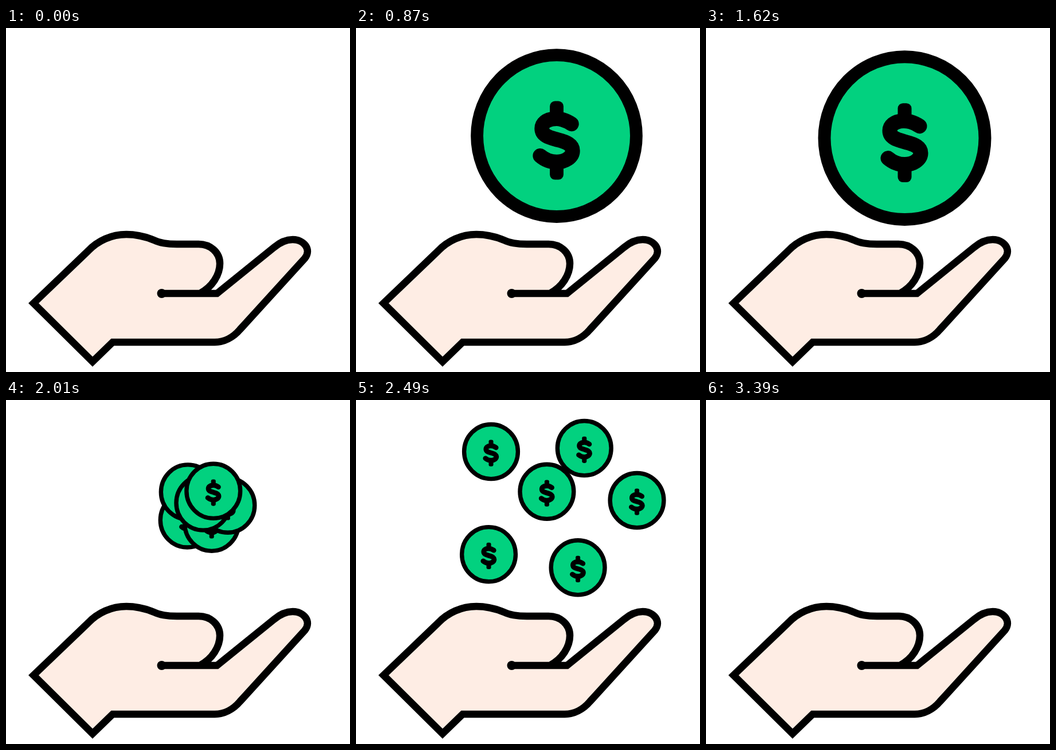
These frames come from a looping animation (600x600 px, 3.63 s). An HTML page:

```html
<!DOCTYPE html>
<html lang="en">
<head>
<meta charset="utf-8">
<title>Coins over a hand</title>
<style>
  html, body { margin: 0; width: 100%; height: 100%; overflow: hidden; background: #fff; }
  svg { display: block; width: 100vw; height: 100vh; }
</style>
</head>
<body>
<svg viewBox="0 0 600 600">
  <defs>
    <g id="coin">
      <ellipse rx="140" ry="142" fill="#02d17f" stroke="#000" stroke-width="22"/>
      <g transform="translate(0 8)">
        <path d="M26 -29C16 -36 4 -39 -4 -38C-18 -37 -26 -30 -26 -21C-26 -8 -12 -5 2 -1C18 3 28 8 28 18C28 30 14 38 0 38C-12 38 -22 33 -29 27"
              fill="none" stroke="#000" stroke-width="26" stroke-linecap="round"/>
        <rect x="-12" y="-69" width="24" height="34" rx="9"/>
        <rect x="-12" y="35" width="24" height="34" rx="9"/>
      </g>
    </g>
  </defs>
  <path d="M271 463H368L467 383C480 372 492 369 500 369C519 369 534 386 521 402L408 526C396 540 380 548 364 548H186L151 582L48 480L143 389C160 371 184 360 210 360C230 360 246 365 258 370C268 375 280 377 298 377H336C356 377 373 391 373 411C373 430 360 452 338 463"
        fill="#feede4" stroke="#000" stroke-width="12.5" stroke-miterlimit="10"/>
  <circle cx="271.500" cy="463" r="8"/>
  <g id="coins"></g>
</svg>
<script>
const LOOP = 3630, STEP = 30;
const APPEAR = 60, SWELL = 1620, SHRINK = 1680, BURST = 1910, VANISH = 3390;
const SMALL = 0.335;
const CENTER = [348, 187];
// Where each small coin drifts to, relative to CENTER, back to front.
const SPREAD = [
  [-161.8, 114.2], [54.3, 146.3], [-156.3, -134.7],
  [197.3, -16.6], [-21, -37.7], [69.8, -143]
];

const layer = document.getElementById('coins');
const coins = SPREAD.map(() => {
  const use = document.createElementNS('http://www.w3.org/2000/svg', 'use');
  use.setAttribute('href', '#coin');
  return layer.appendChild(use);
});

const progress = (t, from, to) => Math.min(1, Math.max(0, (t - from) / (to - from)));
const mix = (a, b, k) => a + (b - a) * k;
const approach = (t, rate) => 1 - Math.exp(-rate * t);

function place(coin, x, y, scale) {
  coin.setAttribute('transform', `translate(${x} ${y}) scale(${scale})`);
}

function drawBigCoin(t) {
  const age = t - APPEAR + STEP;
  const float = progress(t, 870, SWELL);
  const sway = Math.sin(Math.PI * float) ** 2;
  const shrink = progress(t, SHRINK, BURST) ** 2;
  const x = 350 - 3.5 * float + 6 * sway;
  const y = 185 + 7 * float ** 2 - 3 * sway + 115 * Math.exp(-0.0043 * age);
  const scale = approach(age, 0.0058) * (1 + 0.05 * progress(t, SWELL, SWELL + STEP));
  place(coins[0], mix(x, CENTER[0], shrink), mix(y, CENTER[1], shrink), mix(scale, SMALL, shrink));
}

function drawSmallCoins(t) {
  const k = approach(t - BURST, 0.002193);
  SPREAD.forEach(([dx, dy], i) => place(coins[i], CENTER[0] + dx * k, CENTER[1] + dy * k, SMALL));
}

function frame() {
  const t = Math.floor(performance.now() % LOOP / STEP) * STEP;
  const burst = t >= BURST;
  layer.style.display = t >= APPEAR && t < VANISH ? '' : 'none';
  coins.forEach((coin, i) => { coin.style.display = burst || i === 0 ? '' : 'none'; });
  (burst ? drawSmallCoins : drawBigCoin)(t);
  requestAnimationFrame(frame);
}
frame();
</script>
</body>
</html>
```
